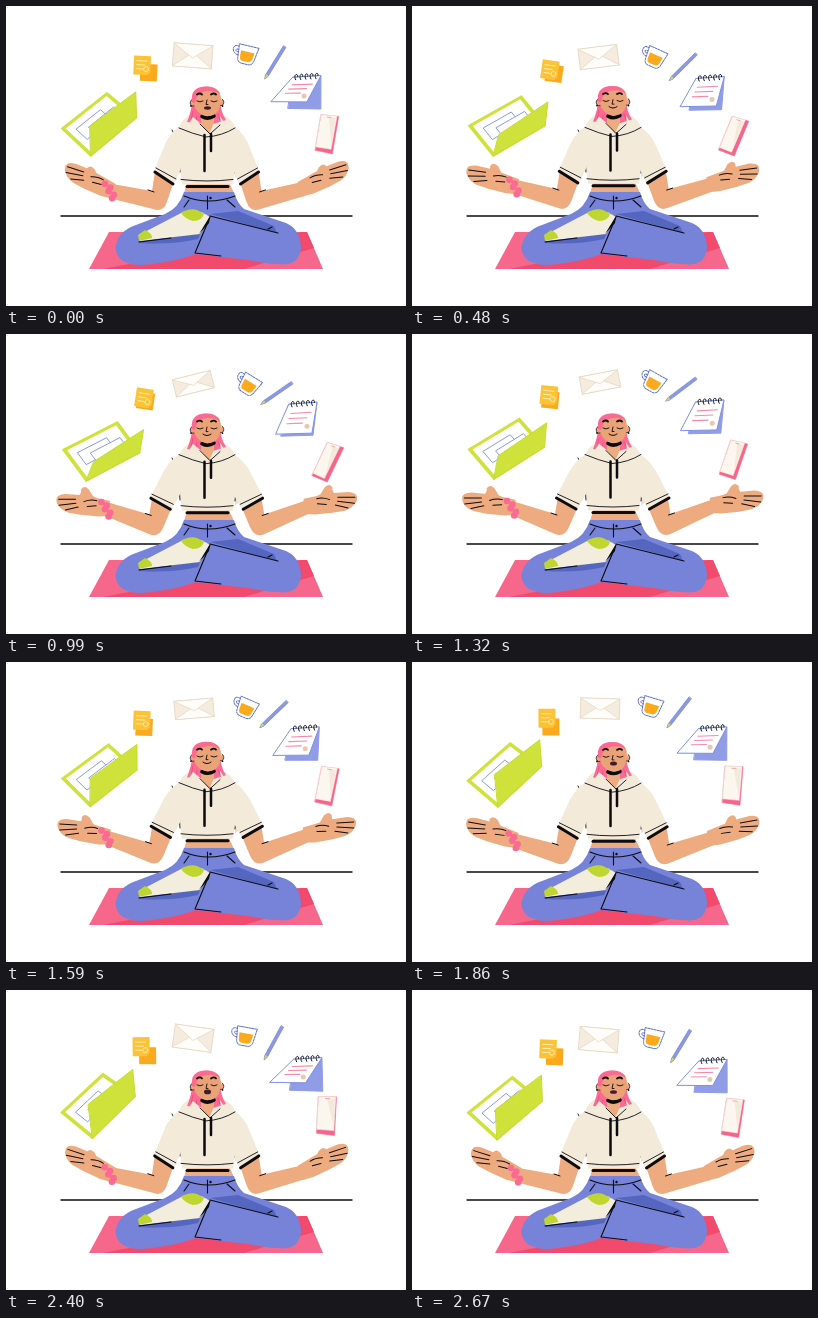
These frames come from a looping animation (400x300 px, 2700 ms). An HTML page with a canvas:

```html
<!DOCTYPE html>
<html lang="en">
<head>
<meta charset="utf-8">
<title>Calm at work</title>
<style>
html, body { margin: 0; width: 100%; height: 100%; overflow: hidden; background: #fff; }
canvas { display: block; width: 400px; height: 300px; }
</style>
</head>
<body>
<canvas id="stage"></canvas>
<script>
const LOOP = 2700, STEP = 30;
const INK = '#0b0b10', SKIN = '#eeab80', PINK = '#fb6a92', CREAM = '#f3eada', TAN = '#e8dac5',
  BLUE = '#7683d8', NAVY = '#5566c0', LINE = '#7d90e6', LIME = '#cfe23b', ORANGE = '#fbaa1d';

const canvas = document.getElementById('stage');
const ctx = canvas.getContext('2d');
const dpr = window.devicePixelRatio || 1;
canvas.width = 400 * dpr;
canvas.height = 300 * dpr;

// Everything floats on one cycle; peak is the phase in degrees
let angle = 0;
const wave = (mid, amp, peak) => mid + amp * Math.cos((angle - peak) * Math.PI / 180);
const mix = (a, b, s) => a.map((v, i) => v + (b[i] - v) * s);
const pairs = flat => Array.from({ length: flat.length / 2 }, (_, i) => [flat[2 * i], flat[2 * i + 1]]);

// Points swinging between two shapes, bobbing by dy
const swing = (a, b, peak, dy) => pairs(mix(a, b, wave(0.5, 0.5, peak))).map(([x, y]) => [x, y + dy]);

function draw(path, fill, stroke, width = 1) {
  const p = new Path2D(path);
  if (fill) { ctx.fillStyle = fill; ctx.fill(p); }
  if (stroke) { ctx.strokeStyle = stroke; ctx.lineWidth = width; ctx.stroke(p); }
}
const ink = (path, width = 1.1) => draw(path, null, INK, width);

function dot(x, y, r, fill) {
  ctx.beginPath();
  ctx.arc(x, y, r, 0, 7);
  ctx.fillStyle = fill;
  ctx.fill();
}

function placed(x, y, deg, paint) {
  ctx.save();
  ctx.translate(x, y);
  ctx.rotate(deg * Math.PI / 180);
  paint();
  ctx.restore();
}

const poly = points => 'M' + points.map(p => p.join(' ')).join('L') + 'Z';

// Point inside a quad given as tl, tr, br, bl
const inside = (q, u, v) => mix(mix(q[0], q[1], u), mix(q[3], q[2], u), v);
const panel = (q, l, t, r, b) => poly([inside(q, l, t), inside(q, r, t), inside(q, r, b), inside(q, l, b)]);
const trace = (q, ...uv) => 'M' + pairs(uv).map(([u, v]) => inside(q, u, v).join(' ')).join('L');

function laptop() {
  const [a, b, right, bottom, c, d] = swing(
    [55, -12.5, 96, -52, 129, -30, 87, 13, 82, -22, 126, -57],
    [57, -15.5, 112, -43, 134, -12, 80, 16, 88, -3, 138, -35], 112, wave(133, 3, 5));
  const screen = [a, b, right, bottom];
  draw(poly(screen), LIME, LIME, 1.5);
  draw(panel(screen, 0.05, 0.06, 0.95, 0.95), '#fff');
  draw(panel(screen, 0.17, 0.24, 0.7, 0.62), '#fff', LINE, 0.9);
  draw(panel(screen, 0.34, 0.4, 0.88, 0.78), '#fff', LINE, 0.9);
  draw(poly([c, d, right, bottom]), LIME, '#c6dc33', 1);
}

function notes() {
  const x = wave(137, 1.8, 100), y = wave(59.7, 4.6, 100), tilt = wave(4, 5.5, 105);
  placed(x + wave(3, 2.7, 340), y + wave(6, 3.6, 290), tilt, () => draw('M-8 -8H9V9H-8Z', ORANGE));
  placed(x, y, tilt, () => {
    draw('M-9 -9H8V7L5 10H-9Z', '#fdc336');
    draw('M-6 -4H4M-6 0H2M-6 4H0M1 4a2.5 2.5 0 1 1 4 2a2.500 2.500 0 0 1 -4 -2', null, '#fff0b5', 0.9);
  });
}

function mail() {
  const b = wave(10, 1.5, 340);
  placed(wave(187.3, 0.8, 220), wave(48.8, 2.3, 65), wave(-3, 11, 312), () => {
    draw(`M-19.5 ${-b}H19.5V${b}H-19.5Z`, '#f5ecdf', TAN, 1);
    draw(`M-19.5 ${b}L-3 -1H3L19.5 ${b}Z`, '#fffdfa', TAN, 0.8);
    draw(`M-19.5 ${-b}L0 ${b * 0.2}L19.5 ${-b}Z`, '#fffdfa', TAN, 0.8);
  });
}

function cup() {
  placed(wave(241.5, 2.1, 100), wave(48.5, 3.6, 85), wave(21, 11, 135), () => {
    ctx.setLineDash([2, 1]);
    draw('M-9 -6C-17 -10 -17 3 -8 2M-9 -3C-13 -5 -13 0 -9 -1', null, '#5368cf', 0.9);
    draw('M-10 -9H10L8 5Q7 9.500 3 9.500H-4Q-8 9 -8.500 5Z', '#fff', '#5368cf', 0.9);
    ctx.setLineDash([]);
    draw('M-7 -3H7L6 4Q5 7 2 7H-3Q-6 7 -6.500 4Z', ORANGE);
  });
}

function pen() {
  placed(wave(268.6, 2.3, 90), wave(56.2, 5.4, 82), wave(132, 13.5, 140), () => {
    draw('M-19 -1.500H15L19 0L15 1.500H-19Z', '#8b98e2', '#6f7dd3', 0.6);
    draw('M14 -1.500L18.500 0L14 1.500Z', '#d3d65c');
  });
}

function calendar() {
  const [a, b, c, d, right, left] = swing(
    [288, 0, 316, -1.5, 299.5, 23.5, 264, 23, 317, 32, 284, 31],
    [283, 0, 311, -2, 306, 29, 270, 30, 307, 31, 275, 32], 125, wave(69.5, 3, 55));
  const page = [a, b, c, d];
  draw(poly([a, b, right, left]), '#909de6', '#909de6', 1);
  draw(poly(page), '#fff', LINE, 1);
  for (let i = 0; i < 3; i++) {
    const v = 0.32 + i * 0.17;
    draw(trace(page, 0.2, v, 0.86 - i * 0.1, v), null, '#f78aa4', 1.1);
  }
  dot(...inside(page, 0.82, 0.77), 2.5, '#ecc7b0');
  for (let i = 0; i < 5; i++) {
    const [x, y] = inside(page, 0.12 + i * 0.18, 0.03);
    ink(`M${x} ${y + 2}C${x - 3} ${y - 4} ${x + 3} ${y - 5} ${x + 2} ${y - 1}`, 1);
  }
}

function phone() {
  // case, then glass
  const p = swing(
    [312, 0, 330, 0, 329, 39, 311, 37, 312, 0, 329.5, 0, 328.5, 34, 311, 33],
    [322, 0, 338, 5.5, 321, 39.5, 306, 33, 322, 0, 334, 4, 318, 36, 307, 30.5], 110, wave(107.3, 3.2, 65));
  const glass = p.slice(4);
  draw(poly(p.slice(0, 4)), '#f8638a', '#f8638a', 0.6);
  draw(poly(glass), '#fbf6ee', '#f3e6da', 0.6);
  draw(poly([inside(glass, 0.5, 0.06), inside(glass, 0.95, 0.06), inside(glass, 0.95, 0.85)]), '#f3e9dc');
  draw(trace(glass, 0.4, 0.06, 0.65, 0.06), null, '#e8a79b', 0.9);
}

function ground() {
  ink('M55 210H346', 1.3);
  draw('M103 226H301L317 263H83Z', '#f7678b');
  draw('M97 263L200 243L296 226H301L308 242L238 263Z', '#f24a6d');
}

function legs() {
  draw('M178 186H228Q231 197 238 203L280 217Q294 223 295 241Q294 258 278 258.500Q262 258 242 254L190 248Q165 257 135 259Q112 259 109.500 243Q110 228 126 220.500L159 208Q173 202 178 186Z', BLUE);
  draw('M204 208L232 205L268 220L271 227Z', NAVY);
  draw('M133 235L195 226L192 233Q165 239 133 237Z', NAVY);
  draw('M133 229L177 206Q191 202 204 211L194 228L134 235Z', '#f3eddd');
  draw('M175 207Q187 199 198 208Q196 215 187 215Q179 213 175 207Z', '#bfd630');
  draw('M132 229L139 224Q146 227 146 232L133 235Z', '#bfd630');
  draw('M204 210L203 217L193 228Z', INK);
  ink('M204 210L272 227M262 223L266 221M204 211L189 247L215 250M133 236L165 232M201.500 190V203M178 190Q202 200 229 190M183 194L178 201M221 194L229 201');
  dot(204.5, 192, 1.2, INK);
}

function hand(x, y) {
  const tilt = wave(5.5, 10, 330);
  placed(x, y, tilt * 0.35, () =>
    draw('M-28 -13Q-24 -17 -25 -20Q-22 -25 -17 -20L-13 -13L-3 -8L-10 1Z', SKIN));
  placed(x, y, tilt, () => {
    draw('M4 -8L-14 -13L-26 -16L-40 -18Q-48 -18 -49 -14Q-50 -9 -47 -6Q-45 -2 -38 1L-26 4L-8 7L4 7Z', SKIN);
    ink('M-47 -13L-30 -12M-47 -7L-30 -8M-41 -2L-28 -4M-22 -9Q-15 -11 -9 -9M-19 -4L-10 -4', 1);
  });
}

function arm([x, y], s) {
  const f = mix([146, 185, 149, 166, 168, 175, 161, 196, 157, 207, 147, 203],
    [143, 180, 146, 162, 166, 172, 157, 193, 152, 204, 143, 200], s);
  const [upper, cuffOut, cuffIn, inner, elbow, under] = pairs(f);
  draw(`M${x - 3} ${y - 8}L${upper}L${cuffOut}L${cuffIn}L${inner}Q${elbow} ${under}L${x - 1} ${y + 7}Z`, SKIN);
  ink(`M${upper[0] - 4} ${upper[1] - 1}l6 2`, 1);
  hand(x, y);
  const v = mix([169, 119, 160, 136, 148, 166, 168, 179, 175, 162], [168, 119, 157, 138, 143.5, 164, 165, 176, 174, 160], s);
  const [shoulder, bicep, [ox, oy], [ix, iy], pit] = pairs(v);
  draw(`M187 115Q${shoulder} ${bicep}L${ox} ${oy}L${ix} ${iy}L${pit}L180 125Z`, CREAM);
  ink(`M${ox + 2} ${oy - 4}L${ix + 2} ${iy - 6}`, 0.9);
  ink(`M${ox + 1} ${oy}L${ix - 1} ${iy - 1}`, 3);
}

function torso(lift) {
  const hem = 180.5 + lift * 2;
  draw('M182 174H222L228 187Q202 192 178 187Z', SKIN);
  draw(`M187 107Q175 113 173 122L171 135L176 ${hem - 2}H227L233 135L229 122Q227 113 215 108Z`, CREAM);
  draw('M231 137L242 141L238 162L229 172Z', '#e8dcc8');
  ink(`M166 124L172 135M172 136L174 166M232 139L229 167M175 ${hem - 7}Q201 ${hem - 4} 227 ${hem - 7}`, 0.9);
  ink(`M181 ${hem}H222`, 3);
}

function head() {
  draw('M187 92Q185 107 181 116L196 118H207L220 114Q214 105 214 92Z', PINK);
  draw('M195 105H208V117L203 128L195 118Z', SKIN);
  ink('M196 110.500Q202 114 208 110', 3.6);
  draw('M186 93.500a3 3.500 0 1 0 3 6M216 93a3 3.500 0 1 1 -3 6', '#eaa277', INK, 0.7);
  draw('M187 94Q187 81 201 80.500Q215 81 215 94Q214 110 202 110Q189 109 187 94Z', '#eaa277');
  draw('M186 96Q184 80.500 200 80.500Q211 80.500 214 88Q208 84 200 85Q191 86 189 97Z', PINK);
  draw('M187 105L185 115M191 110L190 116M212 108L214 114', null, '#e64d79', 0.8);
  ink('M191 88.500Q194 86.500 196 88.500M205 88.500Q208 86.500 210 88.500', 1.8);
  ink('M191 95Q194 97 197 95M205 95Q208 97 211 95M201 94L200 98.500H202', 0.9);
  dot(185, 100, 0.9, INK);
  dot(216.5, 100, 0.9, INK);
  const open = Math.min(1, wave(0.1, 1.2, 300));
  if (open > 0.3) draw(`M198 102a3.500 ${2.4 * open} 0 1 0 7 0a3.500 ${2.4 * open} 0 1 0 -7 0`, '#431c25');
  else ink('M197 101Q201 104 205 101', 1);
}

function hood() {
  draw('M187 111L194 117L204 129L215 117L214 110L222 122L205 132L180 122Z', CREAM);
  ink('M194 118L204 128L214 119M173 122Q187 128 200 131Q216 130 229 122', 0.9);
  ink('M198.500 129V165M205 128V145', 2.5);
}

function render(t) {
  angle = t / LOOP * 360;
  const spread = wave(0.5, 0.5, 168), lift = -spread;
  const [x, y] = mix([104, 185], [100, 174], spread);
  ctx.setTransform(dpr, 0, 0, dpr, 0, 0);
  ctx.lineJoin = ctx.lineCap = 'round';
  ctx.fillStyle = '#fff';
  ctx.fillRect(0, 0, 400, 300);

  ground();
  torso(lift);
  legs();
  arm([x, y], spread);
  for (let i = 0; i < 5; i++) dot(x - 4 + i * 1.8 + (i % 2 ? 2.5 : -1), y - 7 + i * 3.6, 3.3, PINK);
  ctx.save();
  ctx.translate(401.5, 0);
  ctx.scale(-1, 1);
  arm([x, y - 2], spread);
  ctx.restore();

  placed(0, lift, 0, head);
  placed(0, lift * 1.5, 0, hood);

  [laptop, notes, mail, cup, pen, calendar, phone].forEach(paint => paint());
}

const start = performance.now();
function tick() {
  const t = (performance.now() - start) % LOOP;
  render(Math.floor(t / STEP) * STEP);
  requestAnimationFrame(tick);
}
tick();
</script>
</body>
</html>
```
